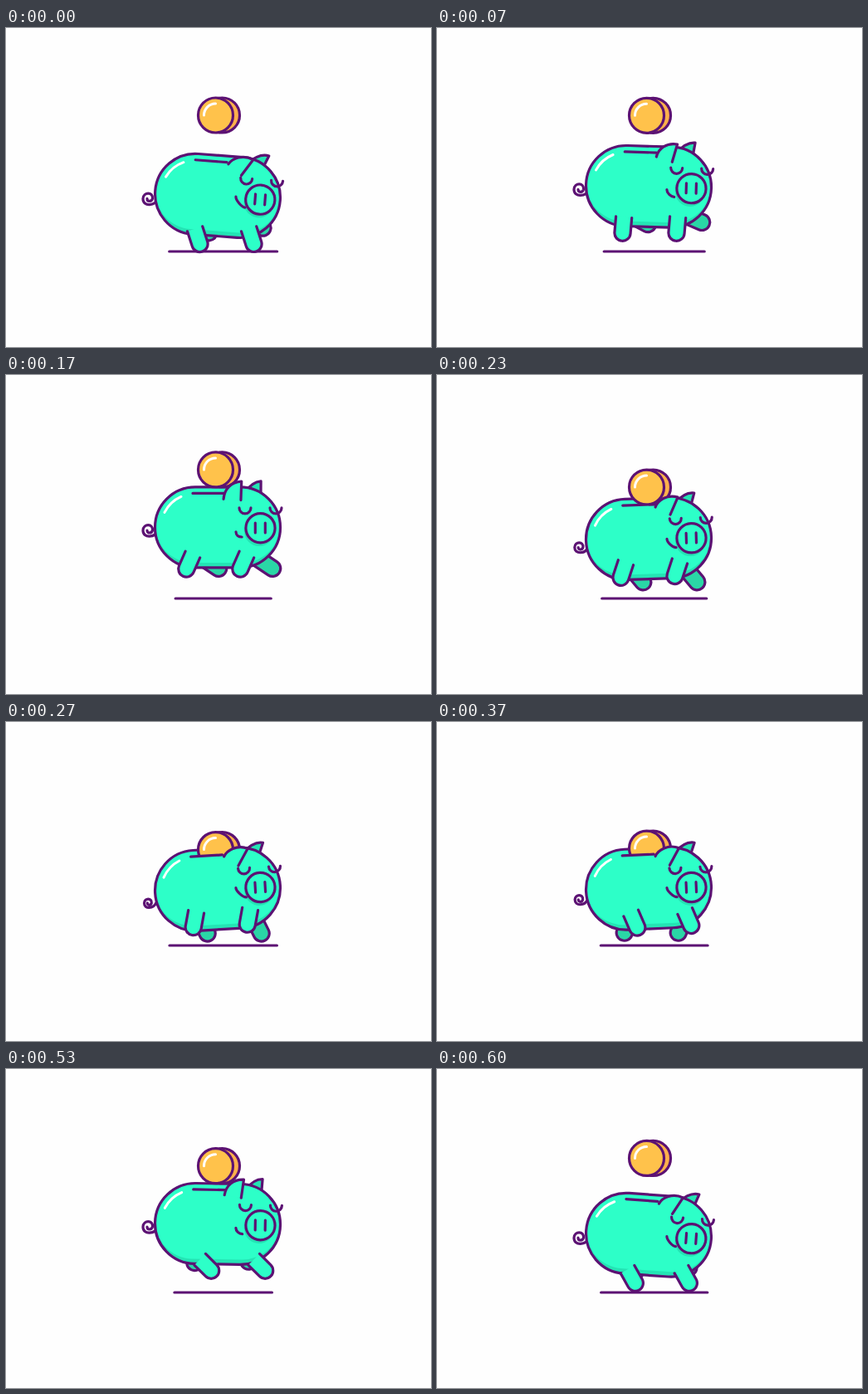
An HTML page for the animation above (0.63 s loop, 512x384 px).

```html
<!DOCTYPE html>
<html lang="en">
<head>
<meta charset="utf-8">
<title>Piggy bank</title>
<style>
  html, body { margin: 0; width: 100%; height: 100%; overflow: hidden; background: #fefefe; }
  svg { display: block; width: 100vw; height: 100vh; }
  .ink { fill: none; stroke: #5c1273; stroke-width: 3.2; stroke-linecap: round; stroke-linejoin: round; }
  .shine { fill: none; stroke: #fff; stroke-width: 3; stroke-linecap: round; }
  .light { fill: #2dffc8; }
  .shade { fill: #24e4b4; }
  .far { fill: #2ad6a6; }
  .back { fill: #fdb04b; }
  .front { fill: #ffc24b; }
  #tail { vector-effect: non-scaling-stroke; }
</style>
</head>
<body>
<svg viewBox="0 0 512 384">
  <defs>
    <clipPath id="above"><path class="pig" d="M-90 -41 H90 V-200 H-90 Z"/></clipPath>
  </defs>
  <path id="ground" class="ink"/>
  <path id="tail" class="ink" d="M12 0 C8 9 -6.5 10 -6.5 0 C-6 -8.5 6 -8.5 5 0 C4 4 -1.5 4 -1.5 0"/>
  <path id="farRear" class="ink far"/>
  <path id="farFront" class="ink far"/>
  <g class="pig">
    <path id="earR" class="ink shade"/>
    <rect class="shade" x="-75.5" y="-48.5" width="151" height="97" rx="48.5"/>
    <rect class="light" x="-75.5" y="-48.5" width="151" height="91" rx="45.5"/>
    <rect class="ink" x="-75.5" y="-48.5" width="151" height="97" rx="48.5"/>
    <path class="shine" d="M-64 -18 A41 41 0 0 1 -44 -37"/>
  </g>
  <path id="nearRear" class="ink light"/>
  <path id="nearFront" class="ink light"/>
  <g clip-path="url(#above)">
    <g id="coin">
      <circle class="ink back" cx="8" r="21"/>
      <circle class="ink front" r="21"/>
      <path class="shine" d="M-14 0 A14 14 0 0 1 0 -14"/>
    </g>
  </g>
  <g class="pig">
    <path class="ink" d="M-30 -41 H8"/>
    <path id="earL" class="ink light"/>
    <circle class="shade" cx="50" cy="4.6" r="18"/>
    <circle class="ink light" cx="51.5" cy=".8" r="17.6"/>
    <path class="ink" d="M45.3 -5.4 v12 M57.3 -5.4 v12"/>
    <path class="ink" d="M26 -23.5 a7 7 0 0 0 14 0 M63 -23.5 a7 7 0 0 0 14 0"/>
    <path id="mouth" class="ink"/>
  </g>
</svg>
<script>
const LOOP = 630, FRAMES = 19, SKIPPED = [3, 9, 12];
const CX = 255, STRIDE = 65, TILT = 4.4, DROP = 290;
const { sin, cos, max, min, hypot, floor, PI } = Math;

const $ = id => document.getElementById(id);
const pig = document.querySelectorAll('.pig');
const set = (id, d) => $(id).setAttribute('d', d);
const place = (e, x, y, more = '') => e.setAttribute('transform', `translate(${x} ${y}) ${more}`);
const smooth = u => u * u * (3 - 2 * u);

// Open-topped leg with a round foot; (dx, dy) points from the foot to the hip.
function leg(id, x, y, dx, dy) {
  const r = 9.6, len = hypot(dx, dy), nx = dy / len * r, ny = -dx / len * r;
  set(id, `M${x + dx + nx} ${y + dy + ny} L${x + nx} ${y + ny} ` +
    `A${r} ${r} 0 0 0 ${x - nx} ${y - ny} L${x + dx - nx} ${y + dy - ny}`);
}

// 0 at the top of a hop, 1 on landing; every second landing is softer.
function landing(w) {
  const c = cos(w + 0.05);
  return c > 0 ? c ** 3.2 : smooth((-c) ** 1.2);
}

// 0 at the top of the toss, 1 at its lowest inside the slot.
function coinFall(t) {
  return t < DROP ? (t / DROP) ** 3.6 : ((LOOP - t) / (LOOP - DROP)) ** 1.42;
}

function drawLegs(w, cy, tilt) {
  const nearX = 233.5 - 16.3 * sin(w), nearY = cy + 51.8 + 6.3 * cos(w + 0.2);
  const swing = (36 * sin(w - 0.17) - 12) * PI / 180;
  const dx = 19 * sin(swing), dy = -19 * cos(swing);
  leg('nearRear', nearX, nearY, dx, dy);
  leg('nearFront', nearX + STRIDE, nearY + min(0, tilt), dx, dy);

  const farX = 239 + 18.5 * sin(w + 0.3), farY = cy + 49 - 4.7 * cos(w);
  const lift = 1.3 * max(0, tilt), hip = cy + 34;
  leg('farRear', farX, farY, 233 - farX, hip - farY);
  leg('farFront', farX + STRIDE, farY - lift, 233 - farX, hip - farY + lift);
}

// Ears flop and the smile widens as the pig lands.
function drawFace(low) {
  const ax = 7 + 3 * low, ay = -34 - 5 * low;
  const lx = 28.5 + 11 * low, ly = -55.5 + 9 * low;
  set('earL', `M${ax} ${ay} C${ax + 1 + 3 * low} ${ay - 12 + 5 * low} ` +
    `${lx - 13} ${ly + 1 - 7 * low} ${lx} ${ly} L${28 - 1.5 * low} ${-33 + 6.5 * low}`);

  const rx = 52 + 6 * low, ry = -55.5 + 3 * low;
  set('earR', `M33 -42 Q${rx - 11} ${ry + 1 - 4 * low} ${rx} ${ry} L52 -38`);

  const my = 5.5 - 6 * low, mx = 29 + 5 * low;
  set('mouth', `M22 ${my} C22 ${my + 4} ${mx - 4} 11.6 ${mx} 11.6`);
}

function draw(t) {
  const w = 2 * PI * t / LOOP;
  const low = landing(w), cy = 183 + 19 * low;
  const lean = cos(w + 0.09) ** 3, tilt = TILT * lean;

  pig.forEach(e => place(e, CX, cy, `rotate(${tilt})`));
  place($('coin'), 252.5, 105 + 67 * coinFall(t));

  const sag = max(0, -lean);
  place($('tail'), 171.5, cy + 3.5 + 17 * sag, `scale(${1 - 0.3 * sag})`);

  const half = 57.4 + 7.6 * low;
  set('ground', `M${261.7 - half} 269 H${261.7 + half}`);

  drawLegs(w, cy, tilt);
  drawFace(low);
}

function frame(now) {
  let i = floor((now % LOOP + 4) / LOOP * FRAMES) % FRAMES;
  if (SKIPPED.includes(i)) i--;
  draw(i * LOOP / FRAMES);
  requestAnimationFrame(frame);
}
draw(0);
requestAnimationFrame(frame);
</script>
</body>
</html>
```
